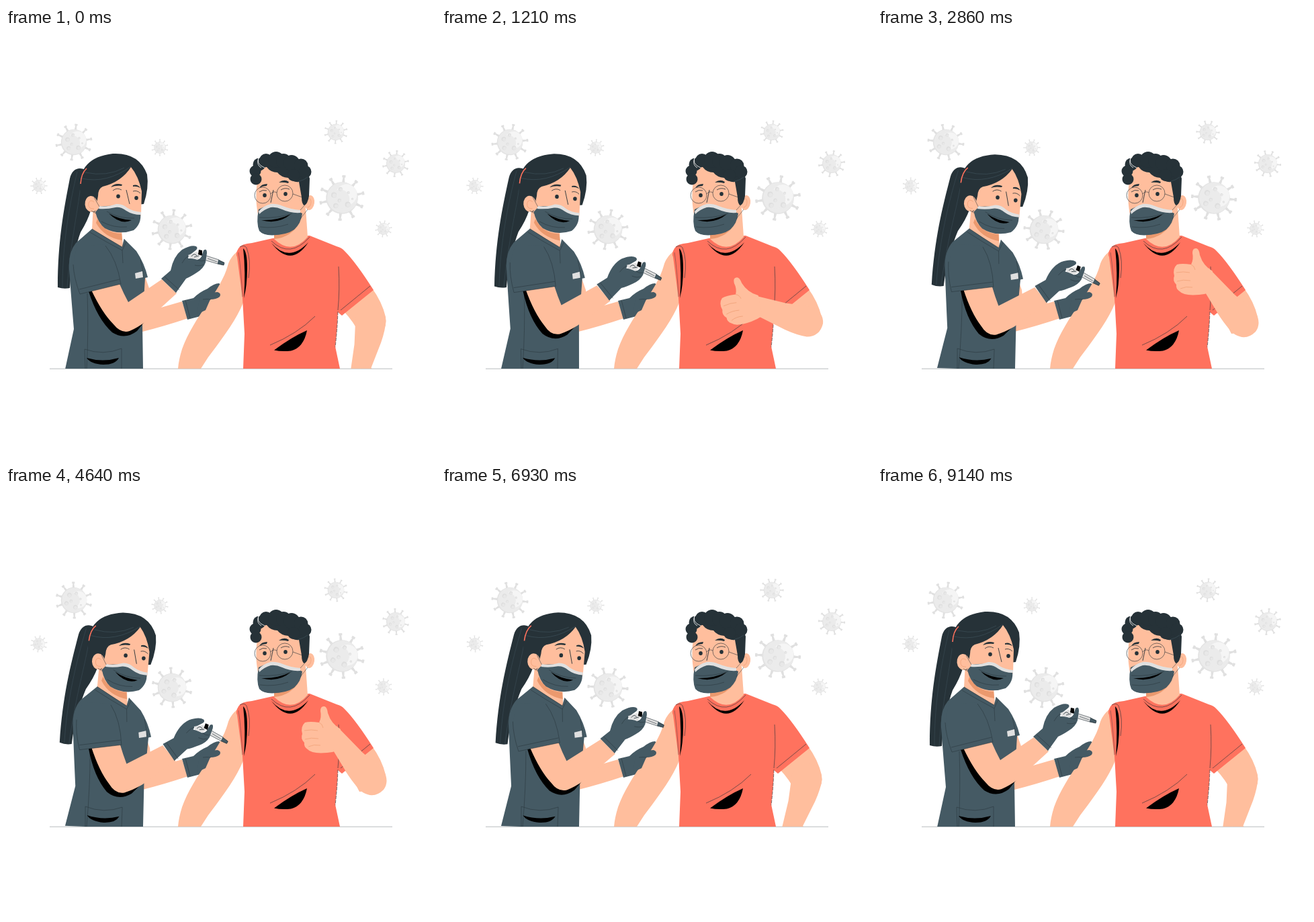
Write an HTML page with a canvas that moves like this. It is 640 px wide and 640 px high and loops after 9640 ms.

```html
<!DOCTYPE html>
<html lang="en">
<head>
<meta charset="utf-8">
<title>Vaccination</title>
<style>
html, body { margin: 0; width: 100%; height: 100%; overflow: hidden; background: #fff; }
canvas { display: block; width: 100vw; height: 100vh; }
</style>
</head>
<body>
<canvas id="stage"></canvas>
<script>
const SIZE = 640, LOOP = 9640;
const canvas = document.getElementById('stage');
const ctx = canvas.getContext('2d');
const dpr = window.devicePixelRatio || 1;
canvas.width = canvas.height = SIZE * dpr;

const HAIR = '#263238', CLOTH = '#455a64', SKIN = '#ffbe9d', SHADE = '#eb996e',
      RED = '#ff725e', PALE = '#e0e0e0', BLACK = '#000';

const cache = {};
const path = d => cache[d] || (cache[d] = new Path2D(d));

function fill(color, d) {
  ctx.fillStyle = color;
  ctx.fill(path(d));
}

function line(d, width = 0.6, color = HAIR) {
  ctx.strokeStyle = color;
  ctx.lineWidth = width;
  ctx.stroke(path(d));
}

function oval(color, x, y, rx, ry = rx, turn = 0) {
  ctx.fillStyle = color;
  ctx.beginPath();
  ctx.ellipse(x, y, rx, ry, turn, 0, Math.PI * 2);
  ctx.fill();
}

function turned(x, y, angle, draw) {
  ctx.save();
  ctx.translate(x, y);
  ctx.rotate(angle);
  ctx.translate(-x, -y);
  draw();
  ctx.restore();
}

function above(y, draw) {
  ctx.save();
  ctx.beginPath();
  ctx.rect(0, 0, SIZE, y);
  ctx.clip();
  draw();
  ctx.restore();
}

// eased progress from 0 to 1 between two moments in seconds
function ease(t, from, to) {
  const u = Math.min(1, Math.max(0, (t - from) / (to - from)));
  return u * u * (3 - 2 * u);
}

/* ---------- viruses ---------- */

// x, y, radius, starting angle of the first spike
const viruses = [
  [101, 170, 27.5, 0.13], [49, 235, 12.5, 0.3], [229, 178, 12.5, 0],
  [247, 300, 30.5, 0.1], [491, 155, 17.5, 0.05], [580, 202, 20, 0.1],
  [500, 253, 34, 0.09], [562, 299, 12.5, 0.15]
];

// x, y, radius of the spots on a virus of radius 1
const spots = [[-.36, -.1, .12], [-.1, -.38, .09], [.26, -.26, .06],
               [-.1, .12, .08], [-.24, .36, .11], [.28, .26, .12], [.46, 0, .05]];

function virus([x, y, r, start], spin) {
  ctx.save();
  ctx.translate(x, y);
  ctx.rotate(spin + start);
  ctx.scale(r, r);
  for (let i = 0; i < 10; i++) {
    ctx.save();
    ctx.rotate(i * Math.PI / 5);
    fill(PALE, 'M-.07 -.6L-.035 -.92H.035L.07 -.6Z');
    line('M-.075 -.95H.075', 0.1, PALE);
    ctx.restore();
  }
  oval('#e3e3e3', 0, 0, 0.7);
  oval('#ebebeb', 0.02, -0.02, 0.67);
  oval('#f5f5f5', 0.18, -0.16, 0.46);
  oval('#ebebeb', -0.08, 0.06, 0.42);
  for (const [sx, sy, sr] of spots) {
    oval('#dedede', sx, sy, sr);
    oval('#e8e8e8', sx + sr * 0.2, sy + sr * 0.15, sr * 0.72);
  }
  ctx.restore();
}

/* ---------- patient ---------- */

function patientArm() {
  fill(SKIN, 'M346 331C337 338 332 346 330 354C325 372 313 391 300 410C285 432 270 455 262 478Q257 494 256 507H290Q300 490 313 474C332 448 349 424 356 400Z');
}

function patientBody() {
  fill(SKIN, 'M503 422L544 386Q560 408 565 430Q567 444 560 452L526 455Q518 438 503 422Z');
  fill(RED, 'M397 313L366 320Q350 321 346 328Q341 336 344 341L352 402L355 455L353 507H497L490 474Q493 450 494 423L500 428L547 390Q521 349 504 332Q500 327 492 325L452 309Z');
  fill(SKIN, 'M399 296V314Q425 339 449 311L446 268Z');
  fill(SHADE, 'M399 303V314Q425 312 438 288Z');
  line('M395 317Q423 344 452 311');
  fill(BLACK, 'M395 320Q421 350 450 319Q424 358 395 320Z');
  fill(BLACK, 'M353 328Q359 333 359 357Q359 384 354 402Q357 364 353 328Z');
  line('M348 326Q354 322 358 327Q365 345 361 372', 0.6);
  line('M346 334Q350 360 352 400', 0.4);
  line('M393 472Q434 455 460 429');
  fill(BLACK, 'M399 479.5Q425 460 448 450Q443 476 424 480.5Q410 482 399 479.5Z');
  line('M495 355Q497 390 494 420');
  ctx.setLineDash([5, 1.5]);
  line('M494 422Q493 450 490 475');
  ctx.setLineDash([]);
  line('M498 420Q520 402 542 384');
}

function patientHead() {
  fill(SKIN, 'M379 205Q369 240 374 272L379 300L434 296L447 265L442 215Z');
  oval(SKIN, 452, 260, 7, 11, 0.15);
  line('M449 267Q454 266 454 258Q453 252 449 255', 0.6, SHADE);

  fill(HAIR, 'M370 212L378 196L395 188L426 193L446 206L452 224L451 250Q449 262 444 264Q440 262 440 252L436 229Q427 230 420 223Q409 222 404 215Q394 215 388 207Q380 206 377 218Z');
  for (const [x, y, r] of [[371, 213, 8.5], [372, 225, 8.5], [377, 203, 9.5], [387, 197, 10], [402, 196, 12],
                          [413, 198, 11], [425, 201, 12], [439, 205, 10.5], [445, 214, 9.5], [428, 219, 9]])
    oval(HAIR, x, y, r);
  line('M378 190Q370 202 385 208M376 193Q372 204 380 208', 0.8, '#fff');
  line('M434 229Q444 226 449 222', 0.5, CLOTH);

  fill(HAIR, 'M377 238Q380 232 389 232L388 235Q382 235 377 238Z');
  fill(HAIR, 'M406 230Q414 224 421 229L420 231Q413 229 406 230Z');
  oval(HAIR, 385, 249, 2.8, 3);
  oval(HAIR, 416, 247, 2.8, 3);
  line('M377 244Q382 240 388 242M409 241Q415 237 422 240', 0.8);
  line('M398 241L394 260', 0.9);
  line('M394 249a12 12 0 1 1-24 0a12 12 0 1 1 24 0M427 246a12 12 0 1 1-24 0a12 12 0 1 1 24 0M394 247Q398 242 403 245M427 247L441 252', 0.6);

  fill(CLOTH, 'M376 270Q388 263 398 264Q412 268 437 274L441 276Q439 291 429 300Q418 308 396 308.5Q382 308 377 302Q372 290 376 270Z');
  fill(PALE, 'M376 273Q382 265 394 262Q402 261 412 265Q424 270 438 271L438 275Q424 276 411 270Q402 266 394 267Q384 270 377 277Z');
  fill(BLACK, 'M380 286Q403 287 424 277Q405 293 380 286Z');
  line('M377 282Q403 284 426 276M378 296Q400 299 420 292', 0.5);
  line('M438 271L447 261M438 284L449 270', 0.5);
}

// forearm and hand are drawn in the raised pose
function thumbUp() {
  fill(SKIN, 'M498 362Q484 354 479 338Q478 329 474 328Q468 327 468 335Q470 344 466 352Q452 350 445 352Q438 358 441 369Q438 376 444 382Q443 388 449 392Q455 399 478 397Q488 396 496 393Z');
  line('M444 364Q455 362 464 364M445 377Q454 374 465 376M450 388Q458 384 468 386M466 352Q471 354 472 360', 0.6, SHADE);
}

function patientForearm(raise) {
  const wrist = 1.6 * raise * (1 - raise);
  turned(543, 437, (raise - 1) * 2.225, () => {
    fill(SKIN, 'M562 423Q571 440 562 452Q548 466 531 456Q521 448 509 430L486 392L492 357L531 397Z');
    turned(488, 378, wrist, thumbUp);
  });
}

/* ---------- nurse ---------- */

function ponytail() {
  fill(HAIR, 'M118 211C108 206 98 210 95 224C86 270 77 318 77 386Q86 389 95 387C97 352 104 324 111 304Q122 286 126 272L120 215Z');
  line('M106 214C95 260 84 320 84 386M112 225C108 270 97 310 91 386', 0.4, CLOTH);
}

function nurseBody() {
  fill(SKIN, 'M130 262L128 300Q145 325 174 326L172 298Z');
  fill(SHADE, 'M136 284Q146 305 172 306L173 316Q146 312 134 290Z');
  fill(CLOTH, 'M128 299L104 320Q92 335 94 360Q97 400 101 448L88 508H204L203 440L207 372L211 371Q206 350 194 332L176 314L173 326Z');
  line('M128 299Q148 312 173 326L176 314M125 304Q148 318 173 331L179 318M173 331L174 350', 0.5);
  line('M121 395Q123 450 120 508M200 345Q204 360 205 372', 0.5);
  line('M118 508L117 478Q145 488 172 477V508', 0.5);
  fill(BLACK, 'M120 491Q144 498 168 491Q163 501 145 501Q126 500 120 491Z');
  fill(PALE, 'M192 365L203 362L204 371L193 373Z');
}

function nurseHead(blink) {
  fill(HAIR, 'M110 240Q107 193 159 187Q198 185 210 218Q213 238 205 262L140 268L131 274Q118 272 120 251Q111 249 110 240Z');
  fill(SKIN, 'M137 250Q137 239 144 236Q172 229 186 207Q197 220 202 243L201 278L190 298L147 298L133 272Z');
  oval(SKIN, 127, 262, 9.5, 12, -0.1);
  line('M131 269Q122 270 123 261Q125 254 131 259', 0.6, SHADE);
  line('M113 224Q150 232 186 206M118 215Q150 222 176 208', 0.5, CLOTH);
  line('M111 232Q112 216 120 209', 1.6, RED);

  fill(HAIR, 'M156 237Q162 230 173 233L172 235Q163 234 156 237Z');
  fill(HAIR, 'M189 234Q196 232 200 238Q194 235 189 236Z');
  oval(HAIR, 167, 250.5, 2.8, 3 * blink);
  oval(HAIR, 194, 253, 2.8, 3 * blink);
  line('M159 242Q165 237 172 241M189 243Q195 241 200 246', 0.8);
  line('M179 241L184 262', 0.9);

  fill(CLOTH, 'M140 266Q160 263 172 267Q184 275 200 276Q202 291 190 301Q167 309 147 298Q137 290 133 274Z');
  fill(PALE, 'M139 265Q150 267 164 262Q173 261 181 268Q189 273 201 274L201 278Q188 278 179 272Q171 266 163 267Q150 270 138 269Z');
  fill(BLACK, 'M153 276Q168 285 187 286Q171 294 153 276Z');
  line('M150 273Q168 284 191 283M142 288Q160 298 180 296', 0.5);
  line('M139 266L131 252M134 276L127 272', 0.5);
}

function backArm() {
  fill(SKIN, 'M200 364L207 370L214 390L217 420L262 407L271 432Q235 444 203 452Z');
}

function gripBack() {
  fill(CLOTH, 'M262 406L279 402Q288 393 300 388Q310 380 317 380L330 390L318 402L297 427L270 434Z');
}

function gripFront() {
  fill(CLOTH, 'M288 402Q302 393 315 393Q321 395 318 400Q313 404 304 404L297 420L284 426Z');
  line('M267 405L274 432M293 404Q299 403 305 404', 0.5);
}

function syringe() {
  fill(PALE, 'M271 338L284 333L290 338L286 344L274 343Z');
  line('M276 340Q280 334 284 339M280 341L287 339', 0.8);
  fill(BLACK, 'M287 330L292 331L292 339L286 337Z');
  fill(PALE, 'M292 337L317 345L315 351L291 344Z');
  line('M292 337L317 345L315 351L291 344M300 343L314 348', 0.6);
  fill(CLOTH, 'M316 345L325 349L324 353L315 351Z');
  line('M317 345.5L325 349.5L324 353L315 351', 0.8);
}

function nurseHand(push) {
  fill(CLOTH, 'M231 373L245 361Q249 340 262 330Q276 322 283 325Q287 328 281 332L272 339L270 346L253 394Z');
  ctx.save();
  ctx.translate(push, push * 0.27);
  syringe();
  ctx.restore();
  fill(CLOTH, 'M262 343Q276 342 285 345Q291 343 292 337L294 331Q299 327 299 335L297 349Q294 358 284 364Q275 370 268 373L253 394L240 378Z');
  line('M236 370L258 390M271 339Q265 344 262 350M285 345Q291 348 296 346M281 353Q289 355 294 352', 0.5);
}

function nurseArm(hand, push) {
  fill(BLACK, 'M123 392Q136 433 158 453Q177 465 195 451L211 431L170 420L140 388Z');
  fill(SKIN, 'M127 390Q143 424 160 441Q171 455 184 451Q196 446 209 436L254 395L232 374L182 408Q175 395 169 381Z');
  turned(243, 384, hand, () => nurseHand(push));
  fill(CLOTH, 'M107 325Q94 350 110 396L171 381Q168 345 146 322Z');
  line('M148 324Q165 345 171 381L110 396Q101 372 100 352M109 389L169 374', 0.5);
}

/* ---------- scene ---------- */

function draw(ms) {
  const t = ms / 1000;
  const lean = ease(t, 0, 3) - ease(t, 6.5, 9.14);
  const lower = ease(t, 0, 1.45) - ease(t, 5.75, 6.95);
  const tilt = ease(t, 0, 2) - ease(t, 5.75, 6.95);
  const raise = ease(t, 0, 1.8) - ease(t, 5.35, 7.15);
  const spin = 0.47 * (ease(t, 0, 4.8) - ease(t, 4.8, 9.6));
  const push = 2 * (ease(t, 3.1, 4) - ease(t, 4.05, 4.5));
  const blink = 1 - 0.85 * (ease(t, 4.85, 4.97) - ease(t, 5.02, 5.14));

  ctx.setTransform(dpr, 0, 0, dpr, 0, 0);
  ctx.fillStyle = '#fff';
  ctx.fillRect(0, 0, SIZE, SIZE);

  viruses.forEach(v => virus(v, spin));
  line('M65 507.2H575', 0.6, '#8a9094');

  const leaning = part => turned(145, 507, 0.0375 * lean, part);
  const nodding = part => leaning(() => turned(140, 312, 0.025 * lean, part));

  backArm();
  gripBack();
  patientArm();
  gripFront();
  patientBody();
  patientHead();

  above(507, () => {
    patientForearm(raise);
    nodding(ponytail);
    leaning(nurseBody);
    nodding(() => nurseHead(blink));
    leaning(() => turned(130, 340, 0.087 * lower, () => nurseArm(0.08 * tilt, push)));
  });
}

const begin = performance.now();
function tick() {
  draw((performance.now() - begin) % LOOP);
  requestAnimationFrame(tick);
}
tick();
</script>
</body>
</html>
```
